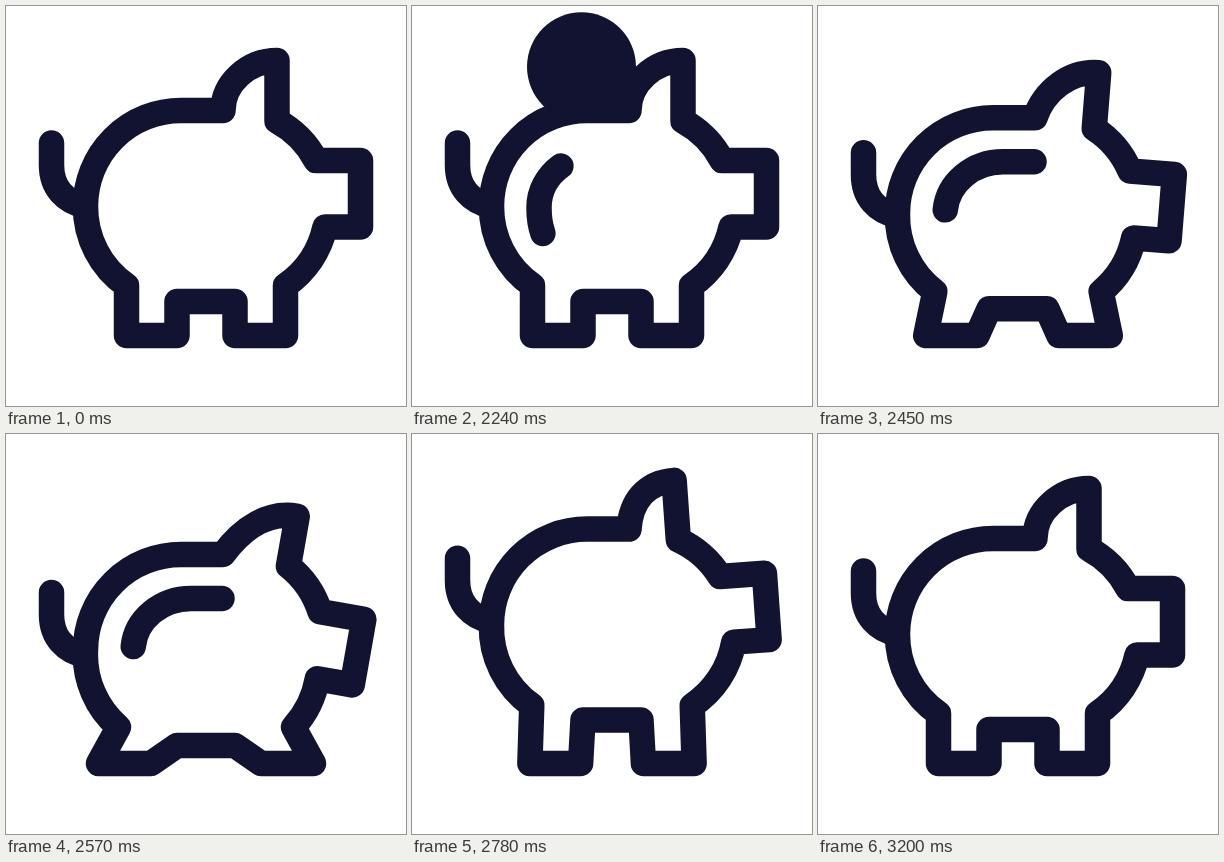
An HTML page for the animation above (3230 ms loop, 400 by 400 pixels).

```html
<!DOCTYPE html>
<html lang="en">
<head>
<meta charset="utf-8">
<title>Piggy bank</title>
<style>
  html, body { margin: 0; height: 100%; overflow: hidden; background: #fff; }
  svg { display: block; width: 100%; height: 100%; }
  path { fill: none; stroke: #121331; stroke-width: 25.5; stroke-linecap: round; stroke-linejoin: round; }
  #body { fill: #fff; }
</style>
</head>
<body>
<svg viewBox="0 0 400 400">
  <circle id="coin" cx="169.5" r="54.5" fill="#121331"/>
  <path id="tail" d="M45.5 137v22c0 23 14 37 34 41"/>
  <path id="body"/>
  <path id="shine" d="M149 253C132 238 127 222 127 201.5A58 53 0 0 1 185 148.5H216"/>
</svg>
<script>
const LOOP = 3230;
const [coin, tail, body, shine] = ['coin', 'tail', 'body', 'shine'].map(id => document.getElementById(id));
const shineLength = shine.getTotalLength();

// sink: drop of the back, tilt: head angle in degrees, splay: how far the legs spread
const poses = [
  { at: 2345, sink: 0, tilt: 0, splay: 0 },
  { at: 2570, sink: 16, tilt: 10, splay: 1 },
  { at: 2830, sink: -12, tilt: -5.5, splay: 0 },
  { at: 3140, sink: 0, tilt: 0, splay: 0 },
];

const mix = (a, b, k) => a + (b - a) * k;
function ease(t, from, to) {
  const k = Math.min(1, Math.max(0, (t - from) / (to - from)));
  return k * k * (3 - 2 * k);
}

function valueAt(t, key) {
  let value = poses[0][key];
  for (let i = 1; i < poses.length; i++) {
    value = mix(value, poses[i][key], ease(t, poses[i - 1].at, poses[i].at));
  }
  return value;
}

const shift = (el, y) => el.setAttribute('transform', `translate(0 ${y})`);
const arcTo = point => `A95.5 95.5 0 0 0 ${point}`;

function drawPig(sink, tilt, splay) {
  const angle = tilt * Math.PI / 180, cos = Math.cos(angle), sin = Math.sin(angle);
  // The head is rigid and turns about (271, 181).
  const head = (x, y) => [
    271 + (x - 271) * cos - (y - 181) * sin,
    181 + (x - 271) * sin + (y - 181) * cos + sink,
  ];
  const back = 104.5 + sink;
  const earTop = 54.5 + 10 * splay;
  // Legs mirror each other: side is -1 for the hind leg, 1 for the front leg.
  const leg = side => [
    [79.5 + 8 * splay, 279.5 + .85 * sink],
    [79.5 + 28 * splay, 329.5],
    [29 + 26 * splay, 329.5],
    [29, 295.5 + sink],
  ].map(([x, y]) => [200 + side * x, y]);
  const [hip, ...hindFoot] = leg(-1);
  const [shoulder, ...frontFoot] = leg(1);

  body.setAttribute('d', `M217 ${back}H175${arcTo([79.5, back + 95.5])}${arcTo(hip)}
    L${hindFoot.concat(frontFoot.reverse())}L${shoulder}
    ${arcTo(head(319, 221))}L${head(354.5, 221)}L${head(354.5, 154.5)}L${head(310, 154.5)}
    ${arcTo(head(271, 115))}L${head(271, earTop)}
    C${head(242, earTop)} ${217 + 20 * splay} ${back - 27} 217 ${back}Z`);
  shift(tail, 1.35 * sink);
  shift(shine, sink);
}

function drawShine(t) {
  const end = shineLength * ease(t, 2030, 2400);
  const start = mix(63 * ease(t, 2030, 2450), shineLength, ease(t, 2570, 2780));
  shine.style.display = t >= 2030 && t < 2780 ? '' : 'none';
  shine.setAttribute('stroke-dasharray', `${Math.max(.01, end - start)} 9999`);
  shine.setAttribute('stroke-dashoffset', -start);
}

function draw(t) {
  coin.setAttribute('cy', mix(-60, 180, ease(t, 2030, 2450)));
  coin.style.display = t < 2500 ? '' : 'none';
  drawPig(valueAt(t, 'sink'), valueAt(t, 'tilt'), valueAt(t, 'splay'));
  drawShine(t);
}

const began = performance.now();
function tick() {
  draw((performance.now() - began) % LOOP);
  requestAnimationFrame(tick);
}
tick();
</script>
</body>
</html>
```
